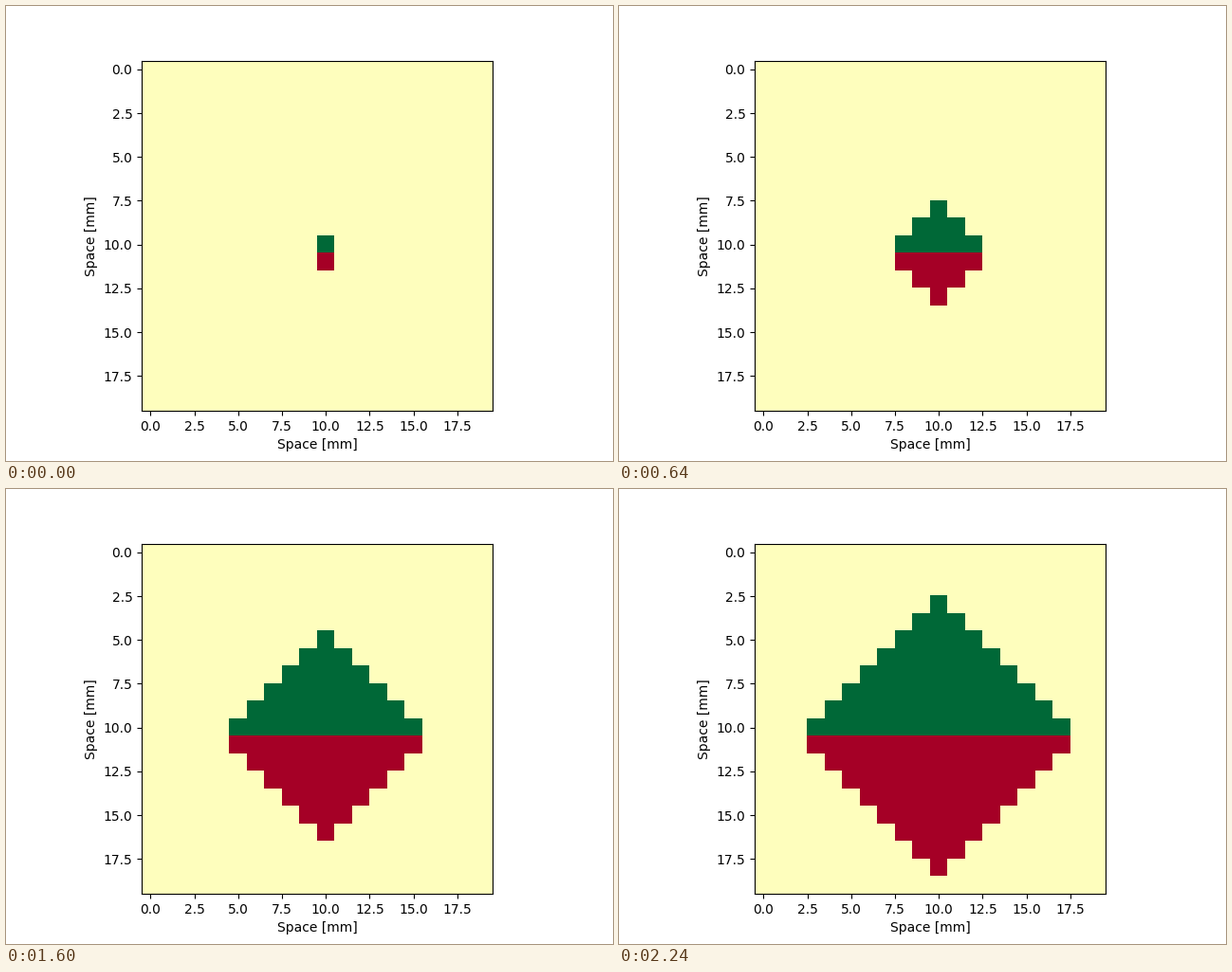
A matplotlib script for the animation above (2560 ms loop, 640 by 480 pixels).

```python
import numpy as np
import matplotlib.pyplot as plt
from matplotlib.animation import FuncAnimation

SIZE = 20
CENTER = 10
STEPS = 8
INTERVAL = 320

rows, cols = np.indices((SIZE, SIZE))


def field(radius):
    """Positive half diamond above the midline, negative one mirrored below."""
    side = np.abs(cols - CENTER)
    upper = (rows <= CENTER) & (side + CENTER - rows <= radius)
    lower = (rows > CENTER) & (side + rows - CENTER - 1 <= radius)
    return upper.astype(float) - lower


fig, ax = plt.subplots(figsize=(6.4, 4.8), dpi=100)
image = ax.imshow(field(0), cmap="RdYlGn", vmin=-1, vmax=1)
ax.set_xlabel("Space [mm]")
ax.set_ylabel("Space [mm]")


def update(step):
    image.set_data(field(step))
    return (image,)


anim = FuncAnimation(fig, update, frames=STEPS, interval=INTERVAL,
                     repeat=True, repeat_delay=0)
plt.show()
```
